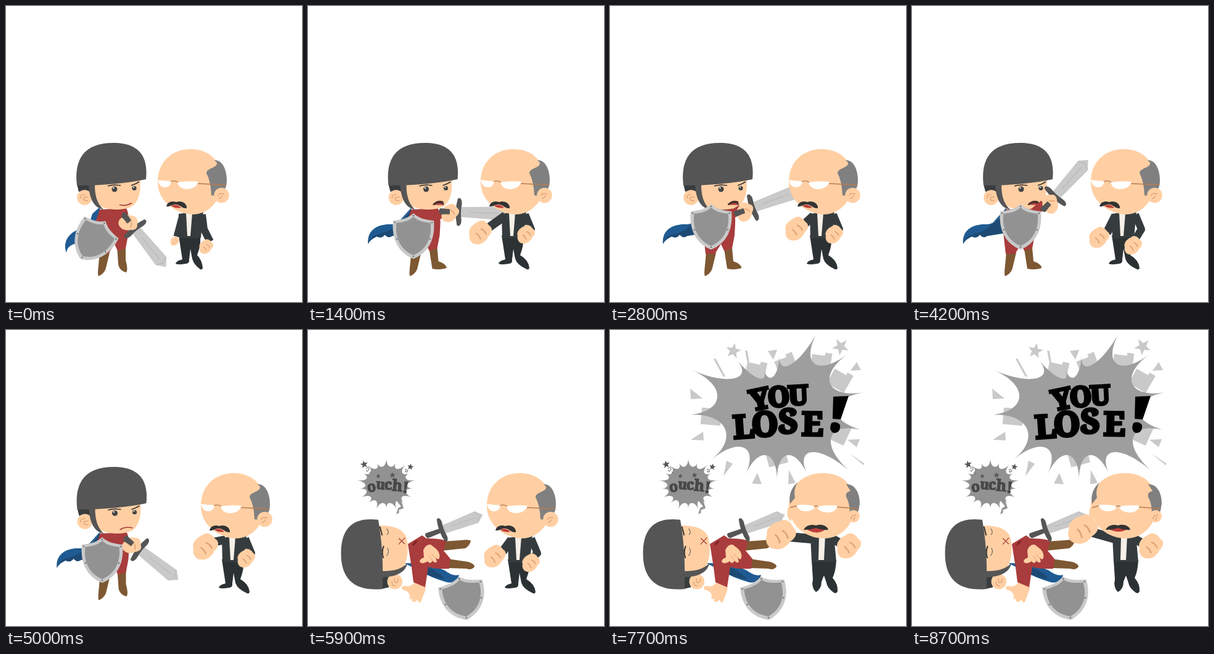
Animation of 480 by 480 pixels, one loop 8.9 s. Source, as an HTML page:

```html
<!DOCTYPE html>
<html>
<head>
<meta charset="utf-8">
<style>
html, body { margin: 0; width: 100%; height: 100%; overflow: hidden; background: #fff; }
svg { display: block; width: 100vw; height: 100vh; }
text { font-family: "Noto Serif", "Liberation Serif", serif; font-weight: 900; text-anchor: middle; }
</style>
</head>
<body>
<svg id="stage" viewBox="0 0 480 480"></svg>
<script>
const SKIN = '#ffcfa3', CREASE = '#dfa477', HELMET = '#555', DARK = '#383c3e', RED = '#a93c3c',
  BOOT = '#7d5832', BLUE = '#1f5b92', NAVY = '#1d4a74', STEEL = '#c9c9c9', GREY = '#929292',
  SUIT = '#363c3e', PANTS = '#2c3234';

const p = (d, fill) => `<path d="${d}" fill="${fill}"/>`;
const line = (d, color, w = 1) =>
  `<path d="${d}" fill="none" stroke="${color}" stroke-width="${w}" stroke-linejoin="round"/>`;
const disc = (x, y, r, fill) => `<circle cx="${x}" cy="${y}" r="${r}" fill="${fill}"/>`;
const g = (transform, ...parts) => `<g transform="${transform}">${parts.join('')}</g>`;

// Thin radial spikes joined by round valleys; a smaller k makes deeper valleys.
function burst(tips, cx, cy, k, fill) {
  const pull = ([x, y]) => [cx + (x - cx) * k, cy + (y - cy) * k];
  let d = 'M' + tips[0];
  tips.forEach((tip, i) => {
    const next = tips[(i + 1) % tips.length];
    d += `C${pull(tip)} ${pull(next)} ${next}`;
  });
  return p(d + 'Z', fill);
}
function star(x, y, r, turn, fill) {
  const pts = [...Array(10).keys()].map(i => {
    const a = i * Math.PI / 5 + turn, q = i % 2 ? r * .42 : r;
    return [x + q * Math.sin(a), y - q * Math.cos(a)];
  });
  return p('M' + pts.join('L') + 'Z', fill);
}
const letters = (list, fill, stroke) => list.map(([ch, x, y, size, turn]) =>
  `<text transform="translate(${x} ${y}) rotate(${turn})" font-size="${size}" fill="${fill}" stroke="${fill}" stroke-width="${stroke}">${ch}</text>`).join('');

const fist = (x, y, r, turn = 0) => g(`translate(${x} ${y}) rotate(${turn}) scale(${r / 16})`,
  p('M-4,-15C2,-20 9,-15 12,-10C19,-6 16,2 11,6C8,13 1,18 -5,17C-12,18 -18,11 -16,3C-19,-5 -11,-12 -4,-15Z', SKIN),
  line('M-7,1Q-2,4 0,10M0,-5Q6,-3 8,3', CREASE, 2));

// Each pose: body x, shield x, y, turn, sword guard x, y, turn
const KNIGHT = {
  ready: [0, 142, 379, 33, 209, 361, 51],
  thrust: [15.5, 155.5, 372, 0, 228.5, 334, 2],
  poke: [4, 160, 357, 0, 227, 327, -20],
  raise: [1, 175, 357, 0, 231, 309, -48],
  lower: [.5, 155.5, 372, 0, 216, 356, 38]
};
// Each pose: body x, then left and right fist as x, y, radius
const MAN = {
  rest: [0, 274, 381, 7, 325, 390, 11],
  low: [34, 246, 367, 18, 320, 370, 14],
  guard: [44, 259, 361, 18, 320, 370, 14],
  drop: [44, 260, 375, 16, 315, 388, 14],
  punch: [70, 254, 351, 20, 320, 370, 14],
  stand: [44, 274, 381, 7, 314, 383, 13]
};
const knightTrack = [[0, 'ready'], [200, 'lower'], [600, 'raise'], [1000, 'poke'], [1400, 'thrust'],
  [1800, 'lower'], [2200, 'raise'], [2800, 'poke'], [3200, 'thrust'], [3600, 'lower'],
  [4200, 'raise'], [4600, 'thrust'], [5000, 'lower']];
const manTrack = [[0, 'rest'], [600, 'drop'], [1000, 'guard'], [1400, 'low'], [1800, 'punch'],
  [2200, 'drop'], [2800, 'guard'], [3200, 'punch'], [3600, 'low'], [4200, 'drop'], [4600, 'punch'],
  [4800, 'low'], [5000, 'punch'], [5400, 'low'], [5600, 'drop'], [6100, 'guard'], [6500, 'stand'],
  [6900, 'stand'], [7300, 'drop']];

function poseAt(track, poses, t) {
  const i = track.findIndex(k => k[0] >= t);
  if (i < 0) return poses[track[track.length - 1][1]];
  const [t1, b] = track[i];
  if (t1 === t) return poses[b];
  const [t0, a] = track[i - 1], u = (t - t0) / (t1 - t0);
  return poses[a].map((v, j) => v + (poses[b][j] - v) * u);
}

const shield = (x, y, turn, sx = 1, sy = 1) => {
  const shape = 'M0,-36C-8,-28 -20,-25 -33,-24C-36,5 -25,28 0,38C25,28 36,5 33,-24C20,-25 8,-28 0,-36Z';
  const rivets = [[0, -32], [-30, -21], [30, -21], [-27, 6], [27, 6], [0, 34]];
  return g(`translate(${x} ${y}) rotate(${turn}) scale(${sx} ${sy})`, p(shape, STEEL),
    g('scale(.84)', p(shape, GREY)), ...rivets.map(([a, b]) => disc(a, b, 1.3, '#777')));
};

const sword = (x, y, turn, held, size = 1) => g(`translate(${x} ${y}) rotate(${turn}) scale(${size})`,
  p('M3,-8L68,-11L80,0L67,11L3,8Z', STEEL), line('M18,0H64M68,-10L72,0L67,10', '#b5b5b5'),
  p('M-2,-21C1,-25 6,-21 5,-12Q3,0 5,12C6,21 1,25 -2,21Q-7,0 -2,-21Z', HELMET),
  held ? fist(-13, 2, 14) : '',
  p(`M-30,-5Q-34,0 -29,5L${held ? '-14,4V-4' : '0,4V-4'}Z`, HELMET),
  held ? disc(-20, 9, 4.5, SKIN) + disc(-13, 10, 5, SKIN) : '');

function knightHead(mood) {
  const face = mood === 'out'
    ? line('M165,291Q175,287 185,291M202,288L216,284', '#333', 2) +
      line('M169,296Q175,301 182,297M203,296Q208,300 213,295', '#555') +
      line('M188,315L199,325M189,325L198,315', RED, 1.3)
    : p('M164,292Q174,288 187,291Q175,290 164,292ZM203,291Q210,289 216,284Q211,288 203,291Z', '#333') +
      line('M165,292Q174,289 186,291M203,291Q210,289 216,285', '#333', 1.6) +
      disc(176, 297, 4.5, '#444') + disc(208, 295.5, 3.6, '#444') +
      disc(174.5, 295, 1.2, '#fff') + disc(207, 294, 1, '#fff') +
      (mood === 'shout'
        ? p('M187,321Q195,313 204,317L205,323Q197,321 187,323Z', '#50302b') +
          p('M190,322Q198,318 204,322Q198,324 190,322Z', '#c4514c')
        : line(mood === 'calm' ? 'M184,322.5Q194,325 204,319.5' : 'M184,324Q193,318 205,321', RED, 1.7));
  return p('M134,284L217,278C220,300 215,318 204,325C190,333 160,331 149,322C138,311 136,300 134,284Z', SKIN) +
    p('M115,289H136V301H118Z', DARK) + disc(127.5, 310.5, 12.3, SKIN) +
    line('M121,312Q120,305 128,306M133,310Q123,309 127,315L133,316', CREASE, 1.5) +
    p('M134,289H144C144,306 147,320 158,330C144,328 135,314 134,289Z', HELMET) + face +
    p('M115,291C110,249 126,222 174,222C222,222 230,251 227,281Q180,291 115,291Z', HELMET);
}

function knight(t) {
  const [x, sx, sy, sr, gx, gy, gr] = poseAt(knightTrack, KNIGHT, t);
  const fighting = gr < 25;
  const cape = t < 200
    ? p('M152,326L140,337L136,350L150,360L114,364C97,372 93,388 98,400C99,392 103,389 110,386L152,380Z', BLUE)
    : p('M152,327C138,350 128,355 118,354C92,354 80,368 82,386C86,379 90,377 96,374Q104,378 109,371Q115,378 121,373L152,368Z', NAVY) +
      p('M152,327C138,350 128,355 118,354C92,354 80,368 83,384C88,366 108,373 124,358Z', BLUE);
  const boots = p('M152,397L168,400L162,425C160,433 153,437 150,438C148,433 150,425 152,397Z', BOOT) +
    p(fighting
      ? 'M181,394L194,392L196,414C203,416 210,421 209,425C200,428 190,427 186,426Z'
      : 'M180,389L194,388L194,412C196,420 198,428 195,432C188,431 182,424 182,418Z', BOOT);
  const tunic = p('M152,330L195,328C201,338 199,355 198,372L194,393L181,397L176,386L166,402H151L145,350Z', RED);
  const arm = fighting ? line(`M190,340L${gx - 18},${gy + (gr < -30 ? 12 : 2)}`, RED, 14) : '';
  const lean = t < 5200 ? 0 : t < 5400 ? -30 : -62;
  return g(`rotate(${lean} 165 430) translate(${x})`, cape, boots, tunic,
    knightHead(fighting ? 'shout' : t < 200 ? 'calm' : 'frown'), arm,
    sword(gx, gy, gr, true), shield(sx, sy, sr));
}

function fallenKnight() {
  return p('M156,378Q198,378 222,390Q235,400 245,397Q241,412 225,409Q200,402 180,390Z', BLUE) +
    p('M180,382Q208,386 222,404Q200,402 180,390Z', NAVY) +
    p('M218,343L248,341Q262,339 264,342Q262,350 255,354L216,358Z', BOOT) +
    p('M226,371L260,376Q270,379 270,384Q265,390 257,387L226,386Z', BOOT) +
    p('M173,409L190,415Q192,420 188,428L183,441Q179,444 178,437Q173,443 169,440L168,435Q163,440 165,430Q163,423 153,421Q150,415 157,415Q166,418 173,409Z', SKIN) +
    p('M162,347L185,333L192,338Q215,338 224,342L220,358L231,371L229,387Q205,388 195,384L190,417L171,409L168,385Z', RED) +
    p('M169,350Q171,342 178,341Q175,348 169,350Z', '#7c2428') +
    p('M187,357Q191,347 199,348L208,355Q215,362 213,370Q211,374 207,369L209,376Q205,379 202,374Q198,381 194,375Q186,381 181,376Q181,371 188,369Z', SKIN) +
    line('M200,363L207,370M196,366L202,374', CREASE) +
    sword(217, 324.5, -20.6, false, .89) + shield(251, 434, -10.5, 1.1, .97) +
    g('translate(121 420) rotate(-88.5) translate(-115 -291)', knightHead('out'));
}

function ouch() {
  const tips = [...Array(18).keys()].map(i => {
    const a = i * Math.PI / 9 - Math.PI / 2, q = i % 2 ? .9 : 1;
    return [127 + 49 * q * Math.cos(a), 251 + 43 * q * Math.sin(a)];
  });
  return burst(tips, 127, 251, .66, GREY) + p('M138,270L149,270L155,289L147,292L148,296L143,299L146,289L151,286Z', GREY) +
    disc(97, 227, 5, '#fff') + disc(159, 229, 5, '#fff') +
    line('M94,225Q99,220 99,226Q95,232 95,227M100,230L103,233M157,226Q163,226 161,230Q156,231 159,228', '#555') +
    star(91, 218, 6.5, -.2, HELMET) + star(166, 222, 5.5, .2, HELMET) +
    star(114, 237, 4, .1, HELMET) + star(137, 235.5, 5, -.1, HELMET) +
    letters([['o', 104, 262, 23, -8], ['u', 117, 258, 22, 6], ['c', 130, 259, 24, 0], ['h', 144, 261, 25, 5], ['!', 157, 264, 25, 8]], '#484848', 1.4);
}

const manLegs = spread => p(`M280,372H315C316,388 313,395 310,404Q${318 + spread},412 ${319 + spread},425Q${318 + spread},428 ${315 + spread},427Q305,420 302,410L299,394L297,411Q298,418 291,418Q280,420 275,418Q276,413 286,411Z`, PANTS);

function man(t) {
  const [x, lx, ly, lr, rx, ry, rr] = poseAt(manTrack, MAN, t);
  return g(`translate(${x})`, manLegs(lr > 10 ? 6 : 0),
    line(`M286,340L${lx + (lr > 10 ? 12 : 3)},${ly - 7}`, SUIT, lr > 10 ? 14 : 11),
    line(`M318,338L${lr > 10 ? 328 : 321},362L${rx + (lr > 10 ? 2 : 6)},${ry - 8}`, SUIT, 12),
    p('M280,337L320,332L316,376L281,377Z', SUIT), p('M292,336H302L299,373H294Z', '#f5f0e8'),
    p('M246,285C246,252 270,232 299,232C330,232 351,252 350,285C350,310 333,338 302,338C278,337 246,319 246,285Z', SKIN),
    p('M338,250C350,249 358,264 358,282Q358,295 354,297Q343,298 340,308L333,307Q332,284 325,271C326,262 343,263 342,254Z', '#808080'),
    disc(349.5, 307, 12.3, SKIN), line('M344,308Q345,302 354,305M345,312Q349,312 351,307', CREASE, 1.5),
    p('M246,282Q257,284 268,284Q267,294 257,294Q248,293 246,282ZM278,286Q295,283 312,285Q308,297 292,297Q280,296 278,286Z', '#fff'),
    line('M267,285Q273,282 279,286M311,288L357,290', '#b87b50', 1.3),
    p('M268,324Q276,320 284,327Q275,329 268,324Z', '#bd3d3a'),
    p('M260,325C262,317 270,316 276,318C284,315 294,320 293,328C286,329 282,322 276,322C270,321 267,326 260,325Z', '#333'),
    fist(rx, ry, rr), fist(lx, ly, lr));
}

function manFront(t) {
  const bob = Math.round((8700 - t) / 200) % 2 ? 9 : 0;
  const rise = t < 7500 ? 16 : 0;
  return p('M327,373H367Q366,392 361,402Q370,412 369,424Q367,428 363,426Q352,418 351,410L347,398L343,408Q343,420 334,425Q326,418 329,404Z', PANTS) +
    line(`M331,339L${285},${326 + bob + rise}`, SUIT, 15) + line(`M360,338L384,${352 + rise}`, SUIT, 14) +
    p('M325,334L363,332L367,376H327Z', SUIT) + p('M339,334H349L347,373H338Z', '#f5f0e8') +
    p('M290,285C290,252 314,232 345,232C378,232 397,252 398,285C396,313 377,338 347,338C318,338 291,318 290,285Z', SKIN) +
    p('M292,282Q288,262 304,247Q297,260 300,272Z', '#808080') +
    p('M383,250C397,250 405,263 405,282L402,297Q391,295 388,309Q391,284 383,271Q381,263 390,261Z', '#808080') +
    p('M289,287Q284,300 293,311L299,292Z', SKIN) + disc(395, 302, 10, SKIN) +
    line('M391,307Q391,300 399,300M395,309L397,303', CREASE, 1.5) +
    p('M302,284Q318,282 333,286Q329,294 318,294Q306,294 302,284ZM335,286Q352,283 369,285Q366,296 352,296Q338,295 335,286Z', '#fff') +
    line('M292,288L303,285M331,287Q334,283 338,287M368,287L404,290', '#b87b50', 1.3) +
    p(`M317,322Q335,317 351,322Q336,${bob ? 335 : 332} 317,322Z`, '#bd3d3a') +
    p('M314,324C318,316 328,315 334,317C342,314 352,317 354,324Q344,325 334,321Q325,324 314,324Z', '#333') +
    fist(388, 350 + rise, 19) + fist(278, 323 + bob + rise, 23, 10);
}

function youLose(t) {
  const size = t < 7300 ? .45 : t < 7500 ? .8 : 1;
  const tips = [[336, 4], [384, 40], [412, 101], [411, 163], [389, 229], [320, 234], [271, 244], [220, 234],
    [166, 209], [127, 138], [133, 65], [206, 49], [249, 64], [275, 42]];
  const blocks = [[236, 68, 12], [286, 58, -20], [342, 54, 8], [372, 82, 30], [164, 140, 5], [370, 168, 25], [270, 205, -15]];
  const chips = 'M256,34L271,32L265,48ZM390,66L400,52L407,65ZM130,95L150,111L131,112ZM131,178L151,165L152,179Z' +
    'M184,237L189,212L199,217ZM230,249L239,232L246,250ZM290,227L301,248L289,250ZM385,178L405,177L400,190Z' +
    'M168,47L171,46L187,75L184,76ZM219,33L223,34L226,54L223,54ZM388,200L413,217L411,219Z';
  return g(`translate(270 125) scale(${size}) translate(-270 -125)`,
    ...blocks.map(([x, y, a]) => g(`translate(${x} ${y}) rotate(${a})`, p('M-16,-13H5V-18H16V14H-16Z', STEEL))),
    p(chips, STEEL), star(200, 34, 13, .2, STEEL), star(374, 27, 14, -.5, STEEL),
    burst(tips, 270, 125, .58, '#9e9e9e'),
    letters([['Y', 246, 128, 46, -12], ['O', 275, 124, 45, -5], ['U', 306, 121, 43, -3],
      ['L', 218, 175, 52, -4], ['O', 252, 172, 55, -3], ['S', 289, 167, 54, 0], ['E', 328, 171, 53, 1]], '#000', 4.5),
    p('M362,108L387,107L374,145L361,144ZM359,151Q367,147 373,154Q374,167 363,167Q354,163 359,151Z', '#000'));
}

function stepTime(t) {
  const [start, end] = t < 5900 ? [0, 5600] : t < 6900 ? [5900, 6500] : [6900, 8700];
  return Math.min(end, start + Math.floor((t - start) / 200) * 200);
}

function scene(t) {
  const fallen = t >= 5600;
  return (t >= 7100 ? youLose(t) : '') + (fallen ? fallenKnight() + ouch() : knight(t)) +
    (t >= 7300 ? manFront(t) : man(t));
}

const stage = document.getElementById('stage');
let shown = -1;
const began = performance.now();
function tick() {
  const t = stepTime((performance.now() - began) % 8900);
  if (t !== shown) stage.innerHTML = scene(shown = t);
  requestAnimationFrame(tick);
}
tick();
</script>
</body>
</html>
```
